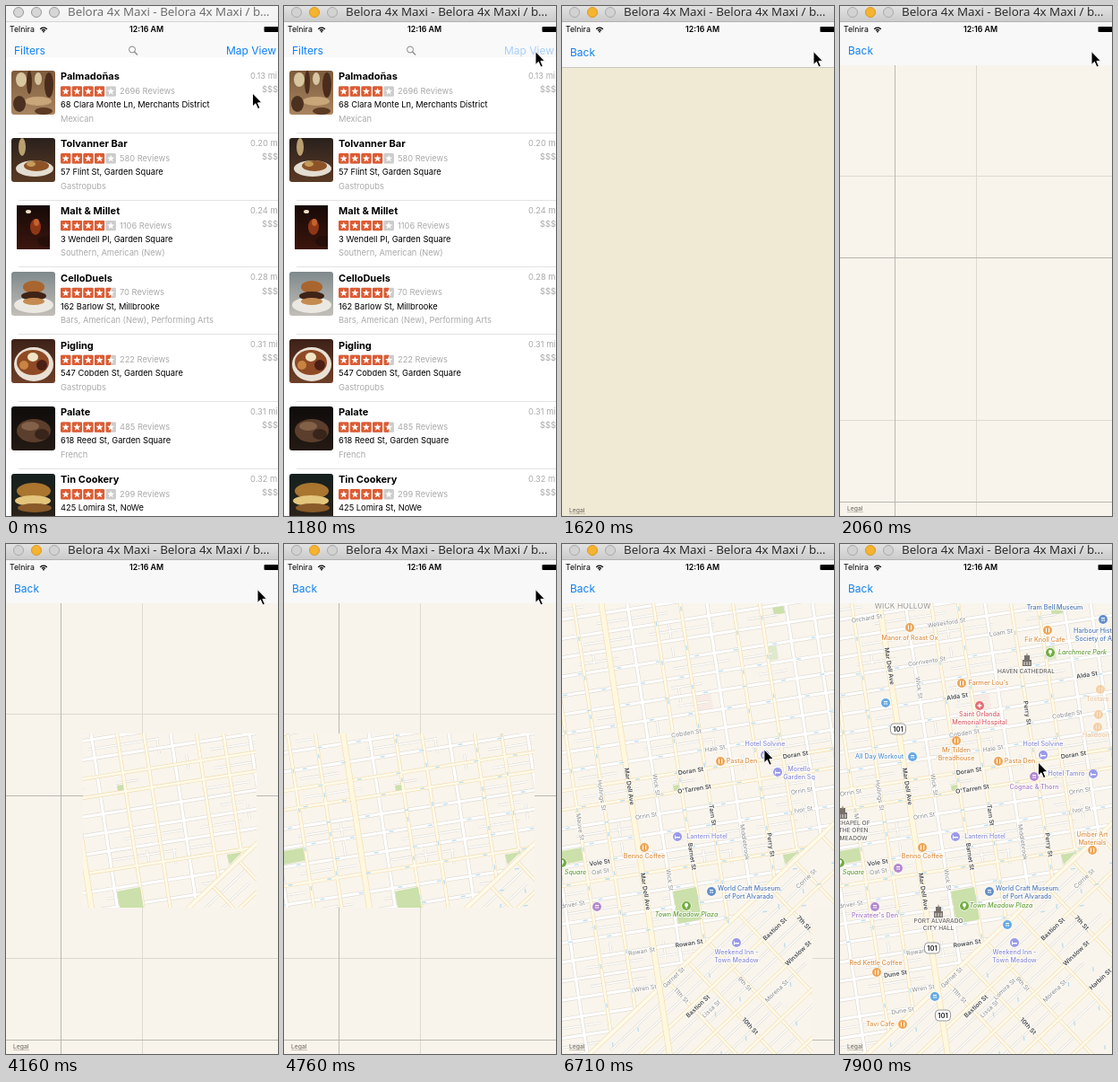
An HTML page with a canvas that plays this animation: 304 by 568 pixels, repeating every 8000 ms.

```html
<!DOCTYPE html>
<html lang="en">
<head>
<meta charset="utf-8">
<title>Nearby places</title>
<style>
html, body { margin: 0; width: 100%; height: 100%; overflow: hidden; background: #fff; }
canvas { display: block; width: 304px; height: 568px; }
</style>
</head>
<body>
<canvas id="stage" width="304" height="568"></canvas>
<script>
const W = 304, H = 568, LOOP = 8000, NAV = 66;
const ctx = document.getElementById('stage').getContext('2d');
const UI = 'Inter, sans-serif';
const BLUE = '#0f80f5';

// ---------- helpers ----------
function rect(color, x, y, w, h) { ctx.fillStyle = color; ctx.fillRect(x, y, w, h); }
function disc(color, x, y, rx, ry = rx) {
  ctx.fillStyle = color;
  ctx.beginPath(); ctx.ellipse(x, y, rx, ry, 0, 0, 7); ctx.fill();
}
function poly(color, pts) {
  ctx.fillStyle = color;
  ctx.beginPath();
  pts.forEach(([x, y]) => ctx.lineTo(x, y));
  ctx.closePath(); ctx.fill();
}
function line(color, width, x0, y0, x1, y1) {
  ctx.strokeStyle = color; ctx.lineWidth = width;
  ctx.beginPath(); ctx.moveTo(x0, y0); ctx.lineTo(x1, y1); ctx.stroke();
}
function text(s, x, y, font, color, align = 'left') {
  ctx.font = font; ctx.fillStyle = color;
  ctx.textAlign = align; ctx.textBaseline = 'middle';
  ctx.fillText(s, x, y);
}
function label(s, x, y, font, color, angle = 0) {
  ctx.save();
  ctx.translate(x, y); ctx.rotate(angle);
  ctx.font = font; ctx.textAlign = 'center'; ctx.textBaseline = 'middle';
  ctx.lineJoin = 'round'; ctx.lineWidth = 2;
  ctx.strokeStyle = 'rgba(255,255,255,.8)'; ctx.strokeText(s, 0, 0);
  ctx.fillStyle = color; ctx.fillText(s, 0, 0);
  ctx.restore();
}
// Count of held steps passed, the first at `from`, the last at `to`.
function steps(t, from, to, n) {
  if (t < from) return 0;
  return Math.min(n, 1 + Math.floor((t - from) / (to - from) * (n - 1)));
}
const smooth = k => k * k * (3 - 2 * k);
const mix = (a, b, k) => a + (b - a) * k;
function random(seed) {
  return () => (seed = seed * 16807 % 2147483647) / 2147483647;
}

// ---------- list ----------
const rows = [
  ['Palmadoñas', 4, 2696, '68 Clara Monte Ln, Merchants District', 'Mexican', '0.13'],
  ['Tolvanner Bar', 4, 580, '57 Flint St, Garden Square', 'Gastropubs', '0.20'],
  ['Malt & Millet', 4, 1106, '3 Wendell Pl, Garden Square', 'Southern, American (New)', '0.24'],
  ['CelloDuels', 4.5, 70, '162 Barlow St, Millbrooke', 'Bars, American (New), Performing Arts', '0.28'],
  ['Pigling', 4.5, 222, '547 Cobden St, Garden Square', 'Gastropubs', '0.31'],
  ['Palate', 4.5, 485, '618 Reed St, Garden Square', 'French', '0.31'],
  ['Tin Cookery', 4, 299, '425 Lomira St, NoWe', 'Sandwiches', '0.32']
];
// Photo: two background tones, then discs (colour, x, y, rx, ry).
const photos = [
  ['#7d5a3c', '#a98660', ['#d8c6a0', 11, 10, 6, 8], ['#d8c6a0', 30, 9, 4, 7], ['#4a2c1c', 20, 13, 3, 13], ['#4a2c1c', 42, 16, 5, 14], ['#c9a679', 30, 34, 15, 5], ['#4b3020', 9, 37, 7, 9], ['#5c3a24', 36, 45, 10, 4]],
  ['#2a211d', '#5a3a24', ['#e3ddd2', 26, 34, 21, 9], ['#8d5327', 28, 31, 14, 6], ['#c59c58', 22, 29, 5, 3], ['#b9a070', 12, 10, 4, 10]],
  ['#160a08', '#3c150d', ['#8f3716', 21, 24, 6, 9], ['#f2dfc4', 13, 7, 3, 2], ['#c4622c', 22, 19, 3, 4], ['#260e0b', 33, 40, 10, 6]],
  ['#7f898c', '#c3bfb8', ['#ebe8e2', 25, 37, 22, 9], ['#a8652f', 25, 17, 12, 7], ['#3f2317', 25, 27, 14, 5], ['#c48b52', 25, 33, 12, 4]],
  ['#3c2118', '#6e3f28', ['#e9e1d5', 25, 28, 22, 19], ['#8f4a25', 24, 26, 18, 14], ['#f0e4c4', 24, 20, 6, 5], ['#4c1f15', 34, 29, 6, 6], ['#c98443', 14, 29, 5, 5]],
  ['#0f0c0b', '#241a14', ['#5c3e2c', 25, 27, 19, 13], ['#836149', 21, 22, 10, 5], ['#38241a', 34, 31, 8, 6]],
  ['#15201f', '#2b221a', ['#a9752f', 25, 19, 19, 9], ['#e3c57c', 24, 30, 20, 6], ['#8a5a28', 26, 38, 19, 5]]
];
function photo([top, low, ...spots], y, narrow) {
  const x = narrow ? 12 : 6, w = narrow ? 37 : 49;
  ctx.save();
  ctx.beginPath(); ctx.roundRect(x, y, w, 49, narrow ? 0 : 3); ctx.clip();
  const g = ctx.createLinearGradient(0, y, 0, y + 49);
  g.addColorStop(0, top); g.addColorStop(1, low);
  rect(g, x, y, w, 49);
  spots.forEach(([c, cx, cy, rx, ry]) => disc(c, x + cx, y + cy, rx, ry));
  ctx.restore();
}
function star(x, y, part) {
  ctx.save();
  ctx.beginPath(); ctx.roundRect(x, y, 11.5, 11.5, 1.5); ctx.clip();
  rect('#ccc', x, y, 12, 12);
  rect('#dd5b32', x, y, 11.5 * part, 12);
  ctx.restore();
  const pts = [];
  for (let i = 0; i < 10; i++) {
    const a = -Math.PI / 2 + i * Math.PI / 5, r = i % 2 ? 1.8 : 4.3;
    pts.push([x + 5.75 + r * Math.cos(a), y + 6 + r * Math.sin(a)]);
  }
  poly('#fff', pts);
}
function drawList(dimmed) {
  const small = '9.3px ' + UI;
  rect('#fff', 0, 17, W, H);
  rect('#f9f9f9', 0, 17, W, 40);
  rows.forEach(([name, rating, count, address, kind, miles], i) => {
    const y = 66.4 + 74.8 * i;
    photo(photos[i], Math.round(y + 5.5), i === 2);
    text(name, 61, y + 12.6, '700 11px ' + UI, '#000');
    for (let s = 0; s < 5; s++) star(61 + 12.6 * s, y + 22.8, Math.max(0, Math.min(1, rating - s)));
    text(count + ' Reviews', 127, y + 28.8, small, '#aaa');
    text(address, 61, y + 44, small, '#000');
    text(kind, 61, y + 59.5, small, '#aaa');
    text(miles + ' mi', 273, y + 11.8, small, '#aaa');
    text('$$$', 286, y + 27, small, '#aaa');
    rect('#e3e3e3', 14, Math.round(y + 74.3), W, 1);
  });
  text('Filters', 9, 50, '12px ' + UI, BLUE);
  text('Map View', 246, 50, '12px ' + UI, dimmed ? '#a9d0f7' : BLUE);
  ctx.strokeStyle = '#888'; ctx.lineWidth = 1;
  ctx.beginPath(); ctx.arc(141, 48.5, 3.5, 0, 7); ctx.stroke();
  line('#888', 1.2, 143.5, 51, 147, 54.5);
}

// ---------- map roads ----------
const SLOPE = .155;
const across = (c, x0 = -5, x1 = 310) => [x0, c - SLOPE * x0, x1, c - SLOPE * x1];
const down = (b, y0 = 40, y1 = 580) => [b + .152 * (y0 - 211), y0, b + .152 * (y1 - 211), y1];
const along = (g, x0 = -5, x1 = 310) => [x0, 597 + g - .94 * x0, x1, 597 + g - .94 * x1];
const cross = k => { const x = (597 - k) / 2; return [x, k + 1.06 * x, 320, k + 339]; };

const streets = [], avenues = [], alleys = [];
for (let k = -10; k <= 16; k++) {
  const busy = [0, 1, 5].includes(k);
  (busy ? avenues : streets).push(across(275 + 21.2 * k));
}
[-26, 95, 184, 272, 302, 332].forEach(b => streets.push(down(b)));
[4, 35, 124, 154, 213, 243].forEach(b => avenues.push(down(b)));
const rnd = random(77);
for (let k = -10; k <= 16; k++) {
  for (let i = 0; i < 3; i++) {
    const x = -10 + 100 * i + rnd() * 50;
    if (rnd() < .65) alleys.push(across(285.6 + 21.2 * k, x, x + 25 + rnd() * 55));
  }
}
for (let i = 0; i < 18; i++) {
  const b = 18 + 30 * Math.floor(rnd() * 10), y = 70 + rnd() * 400;
  alleys.push(down(b, y, y + 17));
}
const southAlleys = [18, 36, 72, 90, 126, 144, 180, 198].map(g => along(g, 50 + rnd() * 60, 220 + rnd() * 90));
const southRoads = [54, 108, 162, 216].map(g => along(g));
const southCross = [17, 77, 136, 203, 270, 316, 362].map(cross);

function roads(list, width, fill, edge) {
  list.forEach(l => line(edge, width + 1.2, ...l));
  list.forEach(l => line(fill, width, ...l));
}
const WHITE = ['#fff', '#dedad1'], YELLOW = ['#fffaea', '#f0dcae'];

function clipped(pts, draw) {
  ctx.save();
  ctx.beginPath(); pts.forEach(([x, y]) => ctx.lineTo(x, y)); ctx.clip();
  draw();
  ctx.restore();
}
function drawRoads() {
  rect('#f9f5ed', 0, NAV, W, H);
  poly('#f8ebe5', [[147, 167], [166, 164], [169, 183], [150, 186]]);
  poly('#dfe9cd', [[229, 112], [239, 110], [242, 128], [232, 130]]);
  const green = '#cbe0ab';
  poly(green, [[235, 70], [247, 67], [249, 77], [237, 79]]);
  poly(green, [[124, 269], [131, 268], [132, 275], [125, 276]]);
  poly(green, [[0, 342], [23, 338], [26, 352], [0, 357]]);
  clipped([[0, 0], [304, 0], [304, 311], [30, 569], [0, 569]], () => {
    roads(alleys, 1.5, ...WHITE);
    roads(streets, 3.2, ...WHITE);
    roads(avenues, 2.8, ...YELLOW);
    poly(green, [[124, 387], [150, 382], [156, 418], [130, 423]]);
    poly(green, [[247, 346], [264, 343], [250, 357]]);
  });
  clipped([[304, 311], [304, 568], [30, 569]], () => {
    roads(southAlleys, 1.5, ...WHITE);
    roads(southCross, 2.6, ...YELLOW);
    roads(southRoads, 2.8, ...YELLOW);
  });
  roads([along(0)], 4, ...YELLOW);
  roads([down(66)], 5.5, '#fff8df', YELLOW[1]);
}
function drawArrows() {
  ctx.save();
  ctx.setLineDash([5, 39]);
  [...avenues, ...streets.slice(4, 16)].forEach((l, i) => {
    ctx.lineDashOffset = i * 17;
    line('#b9dcee', 1.3, ...l);
  });
  ctx.restore();
}

// ---------- map labels ----------
const ACROSS = -.155, DOWN = 1.42, ALONG = -.755, CROSS = .815;
const boldNames = [
  ['Mar Dell Ave', 75, 270, DOWN], ['Mar Dell Ave', 93, 387, DOWN],
  ['Tarn St', 168, 302, DOWN], ['Perry St', 233, 335, DOWN], ['Barnet St', 145, 348, DOWN],
  ['Doran St', 144, 253, ACROSS], ['Doran St', 261, 235, ACROSS],
  ["O'Tarren St", 148, 273, ACROSS], ['Vole St', 42, 355, ACROSS],
  ['Rowan St', 142, 445, ACROSS],
  ['Bastion St', 238, 429, ALONG], ['Bastion St', 152, 515, ALONG],
  ['Winslow St', 264, 456, ALONG],
  ['7th St', 270, 422, CROSS], ['10th St', 210, 537, CROSS]
];
const plainNames = [
  ['Wick St', 105, 268, DOWN], ['Wick St', 120, 374, DOWN], ['Middlebrook', 204, 332, DOWN],
  ['Hollings St', 44, 280, DOWN], ['Mauve St', 20, 315, DOWN],
  ['Cobden St', 139, 211, ACROSS], ['Hale St', 171, 228, ACROSS],
  ['Orrin St', 94, 303, ACROSS], ['Orrin St', 268, 275, ACROSS], ['Ivor St', 270, 296, ACROSS],
  ['Oat St', 43, 365, ACROSS], ['ndriver St', 10, 402, ACROSS],
  ['Rowan St', 89, 454, ACROSS], ['Wren St', 93, 495, ACROSS],
  ['Garnet St', 125, 483, ALONG], ['Lissa St', 167, 518, ALONG],
  ['Morena St', 240, 498, ALONG], ['Corrie St', 273, 373, ALONG],
  ['11th St', 133, 503, CROSS], ['9th St', 204, 490, CROSS]
];
const lateBold = [
  ['Mar Dell Ave', 55, 136, DOWN], ['Perry St', 209, 188, DOWN],
  ['Alda St', 131, 170, ACROSS], ['Alda St', 276, 146, ACROSS],
  ['Dune St', 62, 479, ACROSS], ['Harbin St', 291, 485, ALONG]
];
const latePlain = [
  ['Wick St', 88, 160, DOWN], ['Orchard St', 30, 83, ACROSS], ['Wellesford St', 119, 88, ACROSS],
  ['Loam St', 180, 99, ACROSS], ['Corrivento St', 97, 131, ACROSS], ['Cobden St', 254, 190, ACROSS],
  ['Lomira St', 184, 496, ALONG], ['Orrin St', 12, 277, ACROSS], ['Dune St', 70, 520, ACROSS]
];

// Kinds: icon colour, text colour.
const kinds = {
  food: ['#eda657', '#dc9146'], hotel: ['#9a9ae8', '#8c8ed8'], care: ['#e56b72', '#d9606a'],
  park: ['#72ad40', '#67a03c'], art: ['#668fc9', '#5079b5'], club: ['#b589cf', '#a87cc5'],
  gym: ['#67a9e6', '#5896d2'], none: [null, '#5079b5']
};
// Kind, icon place, name (| breaks the line), place of its first line.
const places = [
  ['food', 177, 242, 'Pasta Den', 201, 242], ['hotel', 227, 235, 'Hotel Solvine', 227, 223],
  ['hotel', 129, 326, 'Lantern Hotel', 162, 326], ['food', 92, 338, 'Benno Coffee', 92, 348],
  ['art', 167, 387, 'World Craft Museum|of Port Alvarado', 209, 384],
  ['hotel', 195, 444, 'Weekend Inn -|Town Meadow', 195, 455],
  ['park', 0, 355, 'Square', 15, 366], ['club', 39, 404, '', 0, 0]
];
const firstOnly = [
  ['hotel', 241, 254, 'Morello|Garden Sq', 265, 251], ['park', 139, 403, 'Town Meadow Plaza', 139, 413]
];
const later = [
  ['food', 78, 93, 'Manor of Roast Ox', 78, 105], ['food', 232, 96, 'Fir Knoll Cafe', 229, 107],
  ['park', 235, 121, 'Larchmere Park', 271, 121], ['care', 156, 180, 'Saint Orlanda|Memorial Hospital', 156, 190],
  ['food', 130, 219, 'Mr Tilden|Breadhouse', 130, 230], ['gym', 81, 237, 'All Day Workout', 44, 237],
  ['park', 139, 403, 'Town Meadow Plaza', 180, 403], ['club', 39, 404, "Privateer's Den", 39, 414],
  ['club', 65, 361, '', 0, 0], ['food', 41, 477, 'Red Kettle Coffee', 40, 467],
  ['gym', 51, 177, '', 0, 0], ['gym', 187, 424, '', 0, 0], ['gym', 106, 504, '', 0, 0]
];
const last = [
  ['none', 0, 0, 'Tram Bell Museum', 240, 71], ['art', 294, 84, 'Harbour History|Society of Arts', 288, 97],
  ['food', 136, 155, "Farmer Lou's", 166, 155], ['club', 217, 259, 'Cognac & Thorn', 217, 271],
  ['hotel', 283, 256, 'Hotel Tamro', 253, 256], ['food', 282, 341, 'Umber Art|Materials', 282, 324],
  ['food', 70, 535, 'Tavi Cafe', 45, 535]
];
const fading = [
  ['food', 291, 162, 'Tostaro', 288, 173], ['food', 289, 190, '', 0, 0], ['food', 288, 204, 'Halidoon', 286, 213]
];

function glyph(kind, x, y) {
  const bar = (dx, dy, w, h) => rect('#fff', x + dx, y + dy, w, h);
  if (kind === 'food') { bar(-2, -2.5, 1, 5); bar(1, -2.5, 1.2, 5); }
  else if (kind === 'hotel') { bar(-3, -1.5, 1, 4); bar(-3, 0, 6, 1.4); }
  else if (kind === 'care') { bar(-2.5, -.7, 5, 1.4); bar(-.7, -2.5, 1.4, 5); }
  else if (kind === 'park') { disc('#fff', x, y - 1, 2, 2.2); bar(-.5, 0, 1, 3); }
  else { bar(-2, -2, 4, 1.2); bar(-1.5, 0, 1, 2); bar(.7, 0, 1, 2); }
}
function place([kind, ix, iy, name, x, y]) {
  const [fill, ink] = kinds[kind];
  if (fill) {
    disc('#fff', ix, iy, 5.6);
    disc(fill, ix, iy, 5);
    glyph(kind, ix, iy);
  }
  const style = (kind === 'park' ? 'italic ' : '') + '500 7.1px ' + UI;
  if (name) name.split('|').forEach((s, i) => label(s, x, y + 9 * i, style, ink));
}
function names(list, bold) {
  const font = bold ? '600 6.9px ' + UI : '6.8px ' + UI;
  list.forEach(([s, x, y, a]) => label(s, x, y, font, bold ? '#4a4a4a' : '#8a8a8a', a));
}
function landmark(x, y, lines, tx, ty) {
  const c = '#77706a';
  rect(c, x - 5, y, 10, 7);
  rect(c, x - 3, y - 5, 2, 6); rect(c, x + 1, y - 5, 2, 6);
  poly(c, [[x - 2, y], [x, y - 8], [x + 2, y]]);
  for (let i = -3; i <= 3; i += 3) rect('#eee', x + i - .5, y + 2, 1, 4);
  lines.forEach((s, i) => label(s, tx, ty + 8.5 * i, '500 6.6px ' + UI, '#6b655f'));
}
function shield(x, y) {
  ctx.fillStyle = '#fff'; ctx.strokeStyle = '#999'; ctx.lineWidth = 1;
  ctx.beginPath(); ctx.roundRect(x - 8.5, y - 6, 17, 12, 4); ctx.fill(); ctx.stroke();
  text('101', x, y + .5, '700 7.5px ' + UI, '#333', 'center');
}
function drawLabels(t) {
  names(plainNames); names(boldNames, true);
  places.forEach(place);
  if (t < 7310) { firstOnly.forEach(place); return; }
  names(latePlain); names(lateBold, true);
  later.forEach(place);
  label('WICK HOLLOW', 70, 69, '500 8.6px ' + UI, '#a5a19b');
  landmark(3, 299, ['CHAPEL OF', 'THE OPEN', 'MEADOW'], 15, 311);
  landmark(110, 409, ['PORT ALVARADO', 'CITY HALL'], 110, 420);
  [[65, 206], [103, 450], [115, 525]].forEach(p => shield(...p));
  if (t < 7610) return;
  last.forEach(place);
  landmark(209, 129, ['HAVEN CATHEDRAL'], 208, 142);
  if (t < 7900) return;
  ctx.globalAlpha = .5;
  fading.forEach(place);
  ctx.globalAlpha = 1;
}

// ---------- map screen ----------
// Left, top, right, bottom, time of arrival.
const tiles = [
  [86, 211, 280, 405, 4160], [0, 211, 86, 405, 4760], [86, 405, 280, 568, 5060],
  [86, 66, 280, 211, 5510], [280, 211, 304, 405, 5810], [0, 405, 86, 568, 6110],
  [280, 66, 304, 211, 6260], [0, 66, 86, 211, 6560], [280, 405, 304, 568, 6860]
];
function drawGrid(alpha) {
  ctx.globalAlpha = alpha;
  rect('#f8f4ec', 0, NAV, W, H);
  rect('#dcd9d1', 152, NAV, 1, H);
  [189, 461].forEach(y => rect('#dcd9d1', 0, y, W, 1));
  rect('#b9b7b1', 61, NAV, 1, H);
  [280, 552].forEach(y => rect('#b9b7b1', 0, y, W, 1));
  ctx.globalAlpha = 1;
}
function drawMap(t, step, shift) {
  ctx.save();
  ctx.translate(0, shift);
  rect('#f0ead5', 0, NAV, W, H);
  if (step >= 7) drawGrid(step === 7 ? .5 : 1);
  const loaded = tiles.filter(tile => t >= tile[4]);
  if (loaded.length) {
    ctx.save();
    ctx.beginPath();
    loaded.forEach(([l, top, r, b]) => ctx.rect(l, top, r - l, b - top));
    ctx.clip();
    drawRoads();
    if (t >= 4760) drawArrows();
    if (t >= 5510) drawLabels(t);
    ctx.restore();
  }
  text('Legal', 8, 559.5, '6.8px ' + UI, '#665f55');
  rect('#a9a295', 8, 563, 18, .6);
  rect('#f8f8f8', 0, 17, W, NAV - 17);
  if (step < 8) rect('#c9c6bb', 0, NAV, W, 1);
  text('Back', 9, 50, '12px ' + UI, BLUE);
  ctx.restore();
}

// ---------- frame of the window ----------
function drawStatus() {
  text('Telnira', 4, 26, '8.8px ' + UI, '#000');
  text('12:16 AM', 157, 26, '600 8.8px ' + UI, '#000', 'center');
  ctx.strokeStyle = '#000'; ctx.lineWidth = 1.2;
  [2.6, 4.9].forEach(r => {
    ctx.beginPath(); ctx.arc(42, 29, r, -Math.PI * .78, -Math.PI * .22); ctx.stroke();
  });
  disc('#000', 42, 28.4, 1);
  ctx.fillStyle = '#000';
  ctx.beginPath(); ctx.roundRect(288.5, 23, 20, 6, 1); ctx.fill();
}
function drawTitle(active) {
  const g = ctx.createLinearGradient(0, 0, 0, 17);
  g.addColorStop(0, active ? '#e2e2e2' : '#f6f6f6');
  g.addColorStop(1, active ? '#cbcbcb' : '#f3f3f3');
  rect(g, 0, 0, W, 17);
  rect(active ? '#b3b3b3' : '#d5d5d5', 0, 17, W, 1);
  [14, 34, 54].forEach(x => {
    const lit = active && x === 34;
    disc(lit ? '#f5b32f' : active ? '#d2d2d2' : '#d6d6d6', x, 7, 5.5);
    ctx.strokeStyle = lit ? '#dc9a24' : active ? '#aaa' : '#999'; ctx.lineWidth = 1;
    ctx.beginPath(); ctx.arc(x, 7, 5.5, 0, 7); ctx.stroke();
  });
  text('Belora 4x Maxi - Belora 4x Maxi / b…', 69, 7.5, '13.4px "Open Sans", sans-serif', active ? '#222' : '#666');
}
function drawCursor(t) {
  const a = smooth(steps(t, 150, 740, 5) / 5), b = smooth(steps(t, 6110, 6860, 6) / 6);
  const x = mix(mix(275.5, 281, a), 221.5, b), y = mix(mix(97, 50.5, a), 243, b);
  const shape = [[0, 0], [0, 15], [3.4, 11.8], [6, 17.6], [8.4, 16.5], [5.9, 10.9], [10.5, 10.7]]
    .map(([dx, dy]) => [x + dx, y + dy]);
  poly('#000', shape);
  ctx.strokeStyle = '#fff'; ctx.lineWidth = 1; ctx.lineJoin = 'miter';
  ctx.stroke();
}

function draw(t) {
  const step = steps(t, 1030, 2060, 8);
  const since = (step - 3) * .147 + .07;
  const shift = step < 6 ? Math.round(550 * (1 + 21 * since) * Math.exp(-21 * since)) : 0;
  if (step < 6) drawList(step >= 2);
  if (step >= 3) drawMap(t, step, shift);
  drawStatus();
  drawTitle(step >= 1);
  drawCursor(t);
}
const start = performance.now();
function tick() {
  draw((performance.now() - start) % LOOP);
  requestAnimationFrame(tick);
}
tick();
</script>
</body>
</html>
```
